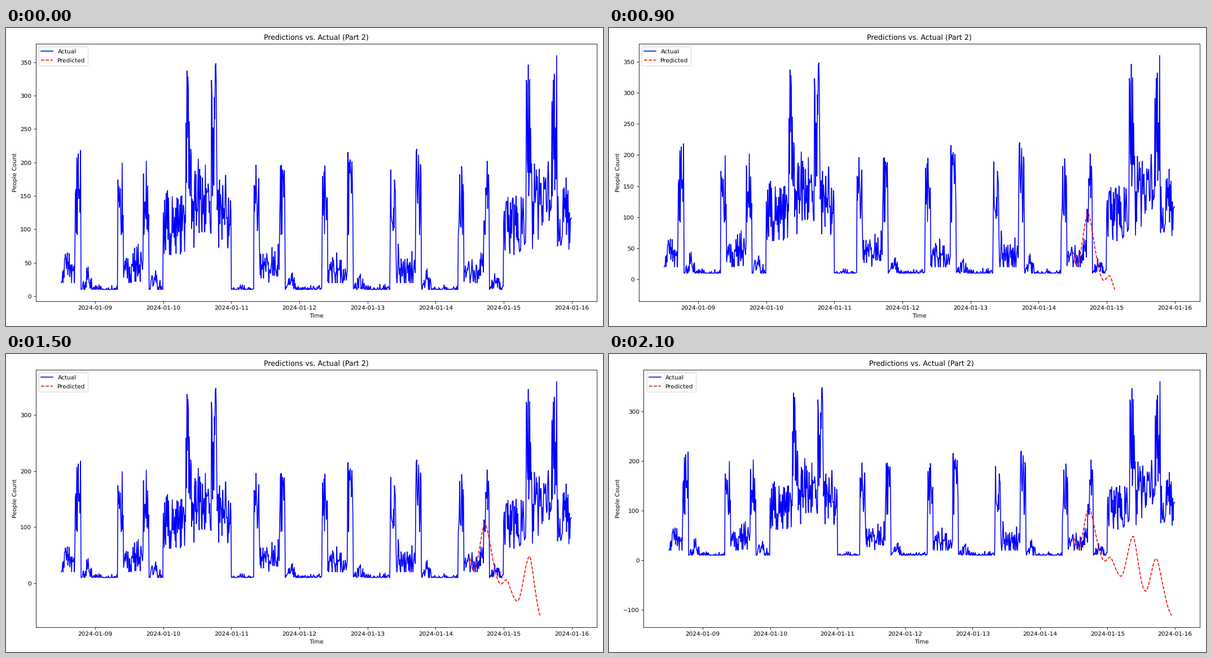
Animation of 1058 by 529 pixels, one loop 2.2 s. Source, as a matplotlib script:

```python
import numpy as np
import matplotlib.pyplot as plt
from matplotlib.animation import FuncAnimation

W, H = 1058, 529
STEP = 10          # samples revealed per frame, one sample is ten minutes
FRAMES = 22
COUNT = 1080
SPLIT = 864        # first predicted sample
DAY = 144
EVENT_DAYS = (2, 7)

# Highest count in each rush period, evening of the first day onwards
PEAKS = (218, 199, 202, 337, 348, 196, 196, 195, 215, 189, 220, 194, 202, 346, 360)

# Turning points of the forecast: sample and value
TURN_AT = np.array([0, 9, 33, 66, 78, 101, 127, 153, 176, 212])
TURN = np.array([45, 21, 106, -1.6, 6, -32.3, 48, -62.5, 3.5, -113])


def people():
    rng = np.random.default_rng(8)
    n = np.arange(COUNT) + DAY // 2
    hour, day = n % DAY / 6, n // DAY
    noise = rng.normal(size=COUNT)

    # Quiet nights with a small bump late in the evening
    evening = (hour > 19.5) & (hour < 23)
    bump = 15 * np.exp(-((hour - 21.2) / 1.2) ** 2)
    v = np.maximum(10, 10 + bump + np.where(evening, 8, 3) * noise)

    work = (hour >= 10) & (hour < 17)
    v[work] = np.clip(42 + 15 * noise, 20, 78)[work]

    event = np.isin(day, EVENT_DAYS)
    v[event] += rng.uniform(50, 150, COUNT)[event]

    # Two-hour rushes at 08:00 and 17:00, scaled to their peak
    for k, peak in enumerate(PEAKS):
        d = (k + 1) // 2
        start = d * DAY - DAY // 2 + (48 if k % 2 else 102)
        low = 150 if d in EVENT_DAYS else 92
        u = rng.random(12)
        u = (u - u.min()) / (u.max() - u.min())
        v[start:start + 12] = low + (peak - low) * u
    return np.round(v)


def forecast(x):
    k = np.clip(np.searchsorted(TURN_AT, x, side="right") - 1, 0, len(TURN) - 2)
    a, b = TURN[k], TURN[k + 1]
    s = (x - TURN_AT[k]) / (TURN_AT[k + 1] - TURN_AT[k])
    s = np.where(b < a, s ** 0.8, s)      # falls start faster than rises
    return a + (b - a) * s * s * (3 - 2 * s)


plt.rcParams["text.hinting"] = "no_hinting"

time = np.datetime64("2024-01-08T12:00") + np.arange(COUNT) * np.timedelta64(10, "m")
predicted = forecast(np.arange(COUNT - SPLIT))

fig, ax = plt.subplots(figsize=(14, 7), dpi=75.5715)
ax.plot(time, people(), color="blue", label="Actual")
line, = ax.plot(time[:0], predicted[:0], color="red", ls="--", label="Predicted")
ax.set_title("Predictions vs. Actual (Part 2)")
ax.set_xlabel("Time")
ax.set_ylabel("People Count")
ax.legend(loc="upper left", labelspacing=0.58)


def update(frame):
    n = frame * STEP
    line.set_data(time[SPLIT:SPLIT + n], predicted[:n])
    ax.relim()
    ax.autoscale_view()
    fig.tight_layout()      # the left edge follows the width of the tick labels
    fig.subplots_adjust(right=1047 / W, top=1 - 28 / H, bottom=1 - 485 / H)
    return line,


anim = FuncAnimation(fig, update, frames=FRAMES, interval=100, repeat=True)
plt.show()
```
